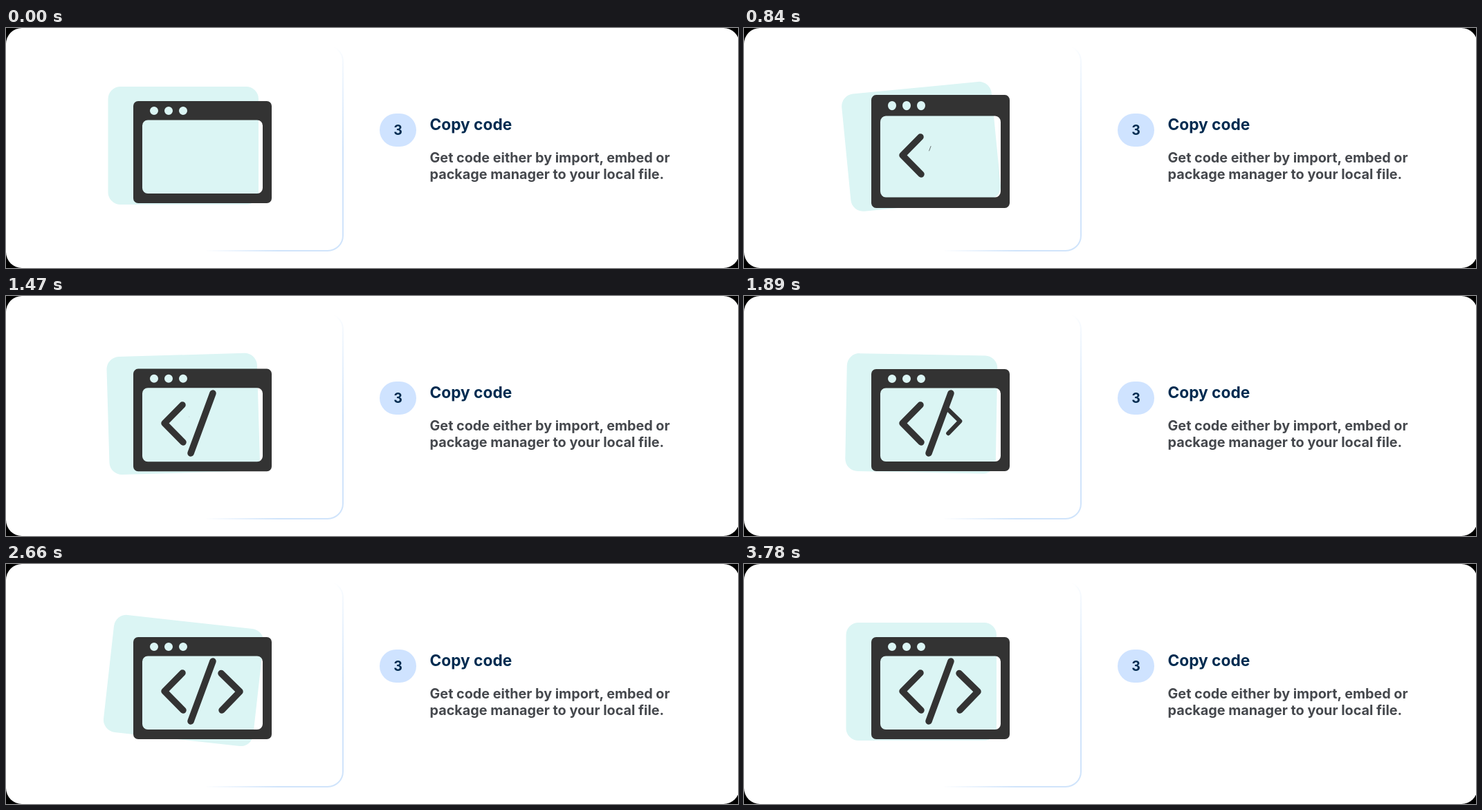
An HTML page for the animation above (4.69 s loop, 1058x348 px).

```html
<!DOCTYPE html>
<html lang="en">
<head>
<meta charset="utf-8">
<title>Copy code</title>
<style>
  html, body { margin: 0; width: 100%; height: 100%; overflow: hidden; background: #000; }
  svg { display: block; width: 100%; height: 100%; }
  text { font-family: Inter, Roboto, sans-serif; font-weight: 700; }
  .ink { fill: none; stroke: #333; stroke-width: 9.5; stroke-linecap: round; stroke-linejoin: round; }
  .title { font-size: 22.7px; fill: #002b50; }
  .note { font-size: 19.8px; fill: #45484d; }
  .step { font-size: 19.5px; fill: #002b50; text-anchor: middle; }
</style>
</head>
<body>
<svg viewBox="0 0 1058 348">
  <defs>
    <linearGradient id="fade" gradientUnits="userSpaceOnUse" x1="290" y1="316.6" x2="366" y2="365.1">
      <stop offset="0" stop-color="#d0e4fb" stop-opacity="0"/>
      <stop offset="1" stop-color="#d0e4fb"/>
    </linearGradient>
  </defs>
  <rect width="1060" height="348" rx="23" fill="#fff"/>
  <path d="M290 323H465A22 22 0 0 0 487 301V48A22 22 0 0 0 465 26" fill="none" stroke="url(#fade)" stroke-width="2"/>

  <rect id="panel" x="147.5" y="85" width="217.5" height="171" rx="18" fill="#dbf5f4"/>
  <path id="frame" fill="#333" fill-rule="evenodd"/>
  <path id="left" class="ink" d="M255 158L229 184.5L256 212"/>
  <path id="slash" class="ink" d="M299 141L267 228"/>
  <path id="right" class="ink" d="M311 158.5L338 185L312 212"/>

  <rect x="540" y="124" width="53" height="48" rx="24" fill="#cfe3ff"/>
  <text class="step" x="566.5" y="155">3</text>
  <text class="title" x="612.5" y="148">Copy code</text>
  <text class="note" x="612.5" y="195">Get code either by import, embed or</text>
  <text class="note" x="612.5" y="219">package manager to your local file.</text>
</svg>
<script>
  const LOOP = 4690, STEP = 70, REST = 3780;
  const byId = id => document.getElementById(id);

  // [time in ms, value]
  const tilt = [[0, 0], [770, -6], [1740, 0], [2740, 6.9], [3780, 0]];
  const stretch = [[0, 1], [420, 1.108], [840, 1.108], [1190, 1.047], [1500, 1]];

  // Strokes grow from a point: id, start, end, origin
  const strokes = [
    ['left', 0, 800, 267.5, 175],
    ['slash', 790, 1470, 267.7, 174],
    ['right', 1460, 2120, 264, 175]
  ];

  function at(keys, t) {
    for (let i = 1; i < keys.length; i++) {
      const [t0, a] = keys[i - 1], [t1, b] = keys[i];
      if (t <= t1) return a + (b - a) * (t - t0) / (t1 - t0);
    }
    return keys[keys.length - 1][1];
  }

  const box = (x, y, w, h, r) =>
    `M${x + r} ${y}h${w - 2 * r}a${r} ${r} 0 0 1 ${r} ${r}v${h - 2 * r}a${r} ${r} 0 0 1 ${-r} ${r}` +
    `h${2 * r - w}a${r} ${r} 0 0 1 ${-r} ${-r}v${2 * r - h}a${r} ${r} 0 0 1 ${r} ${-r}z`;
  const dot = x => box(x - 6, 114, 12, 12, 6);

  byId('frame').setAttribute('d',
    box(184, 106, 200, 148, 7) + box(197, 133.5, 174, 106.5, 8) + [214, 235, 256].map(dot).join(''));

  const scale = (id, sx, sy, x, y) => byId(id).setAttribute('transform',
    `translate(${x} ${y}) scale(${sx} ${sy}) translate(${-x} ${-y})`);

  function draw(t) {
    byId('panel').setAttribute('transform', `rotate(${at(tilt, t)} 270 173)`);
    scale('frame', 1, at(stretch, t), 284, 189);
    for (const [id, start, end, x, y] of strokes) {
      const s = Math.min(1, Math.max(0, (t - start) / (end - start)));
      byId(id).style.display = s ? '' : 'none';
      scale(id, s, s, x, y);
    }
  }

  const begin = performance.now();
  function tick() {
    const t = (performance.now() - begin) % LOOP;
    draw(Math.min(REST, Math.floor(t / STEP) * STEP));
    requestAnimationFrame(tick);
  }
  tick();
</script>
</body>
</html>
```
